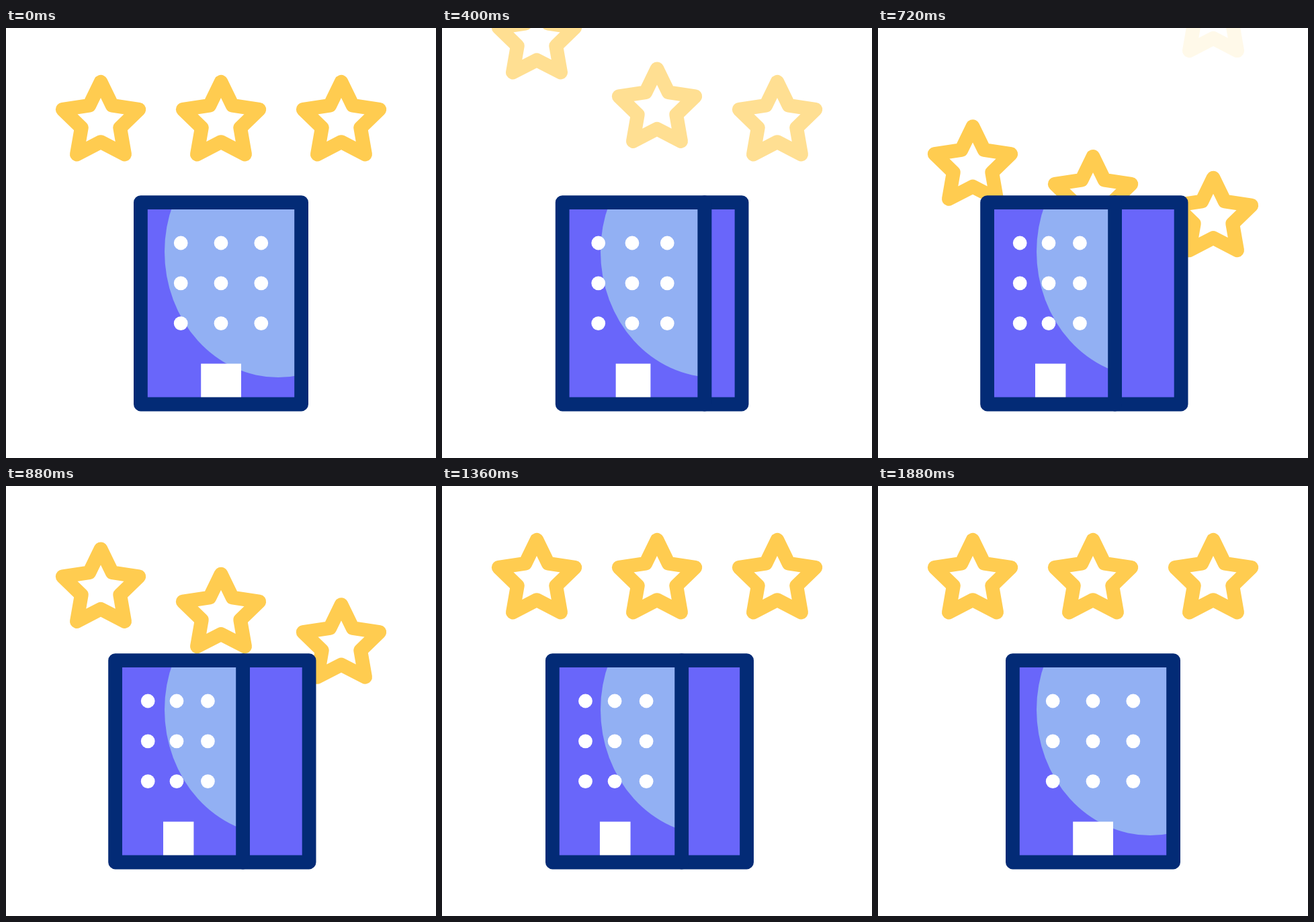
These frames come from a looping animation (640 by 640 pixels, 2000 ms). An HTML page with a canvas:

```html
<!DOCTYPE html>
<html>
<head>
<meta charset="utf-8">
<style>
html, body { margin: 0; height: 100%; overflow: hidden; background: #fff; }
canvas { display: block; }
</style>
</head>
<body>
<canvas id="stage" width="640" height="640"></canvas>
<script>
const ctx = document.getElementById('stage').getContext('2d');
const NAVY = '#032b76', PURPLE = '#6966fa', LIGHT = '#92b0f3', GOLD = '#ffcc50';
const LOOP = 2000, STEP = 40;
const TOP = 259.6, BOTTOM = 560;
const STAR_X = [141, 320, 499];

// Right half of the star, from the top tip to the lower notch.
const half = [[0, 80.3], [17, 115.2], [56.8, 121.2], [28.7, 148.5], [35.6, 188], [0, 169.6]];
const outline = half.concat(half.slice(1, -1).reverse().map(([x, y]) => [-x, y]));
const starPath = new Path2D('M' + outline.join('L') + 'Z');

const mix = (a, b, k) => a + (b - a) * k;
const progress = (t, start, length) => Math.min(1, Math.max(0, (t - start) / length));
const smooth = x => x * x * (3 - 2 * x);

// cubic-bezier(.2, 0, .59, 1)
function swing(x) {
  let lo = 0, hi = 1;
  for (let i = 0; i < 24; i++) {
    const p = (lo + hi) / 2, r = 1 - p;
    if (0.6 * p * r * r + 1.77 * p * p * r + p * p * p < x) lo = p; else hi = p;
  }
  return smooth(lo);
}

function star(x, dy, alpha) {
  ctx.save();
  ctx.globalAlpha = alpha;
  ctx.translate(x, dy);
  ctx.strokeStyle = GOLD;
  ctx.stroke(starPath);
  ctx.restore();
}

function drawStars(t) {
  const fadeOut = 1 - progress(t, 160, 640);
  const fadeIn = progress(t, 400, 240);
  STAR_X.forEach((x, i) => {
    const rise = smooth(progress(t, 187 + 140 * i, 401));
    const enter = smooth(progress(t, 411 + 119 * i, 576));
    if (fadeOut > 0 && rise < 1) star(x, -223 * rise, fadeOut);
    if (fadeIn > 0) star(x, 149 * (1 - enter), fadeIn);
  });
}

function panel(left, right, decorate) {
  ctx.beginPath();
  ctx.rect(left, TOP, right - left, BOTTOM - TOP);
  ctx.fillStyle = PURPLE;
  ctx.fill();
  if (decorate) {
    ctx.save();
    ctx.clip();
    decorate();
    ctx.restore();
  }
  ctx.beginPath();
  ctx.rect(left, TOP, right - left, BOTTOM - TOP);
  ctx.strokeStyle = NAVY;
  ctx.stroke();
}

function ellipse(x, y, rx, ry, color) {
  ctx.beginPath();
  ctx.ellipse(x, y, rx, ry, 0, 0, 2 * Math.PI);
  ctx.fillStyle = color;
  ctx.fill();
}

function drawBuilding(t) {
  const turnIn = swing(progress(t, 140, 560));
  const turn = turnIn - swing(progress(t, 1310, 570));
  const depth = turnIn - smooth(progress(t, 1320, 530));
  const left = mix(200.4, 162.6, turn), right = mix(439.6, 352.6, turn);

  if (depth > 0.001) panel(right, right + 98.5 * depth);
  panel(left, right, () => {
    ellipse(405, 333, 169, 187, LIGHT);
    for (const y of [320, 379.8, 439.6]) {
      [[260.2, 211.2], [320, 254], [379.8, 300.4]].forEach(([from, to]) =>
        ellipse(mix(from, to, turn), y, 10.4, 10.4, '#fff'));
    }
    const door = mix(290.2, 234, depth);
    ctx.fillRect(door, 499.6, mix(350, 279.4, depth) - door, 55);
  });
}

function draw(now) {
  const t = Math.floor((now % LOOP) / STEP) * STEP;
  ctx.fillStyle = '#fff';
  ctx.fillRect(0, 0, 640, 640);
  ctx.lineWidth = 20.8;
  ctx.lineJoin = 'round';
  drawStars(t);
  drawBuilding(t);
}

const begin = performance.now();
function tick() {
  draw(performance.now() - begin);
  requestAnimationFrame(tick);
}
tick();
</script>
</body>
</html>
```
